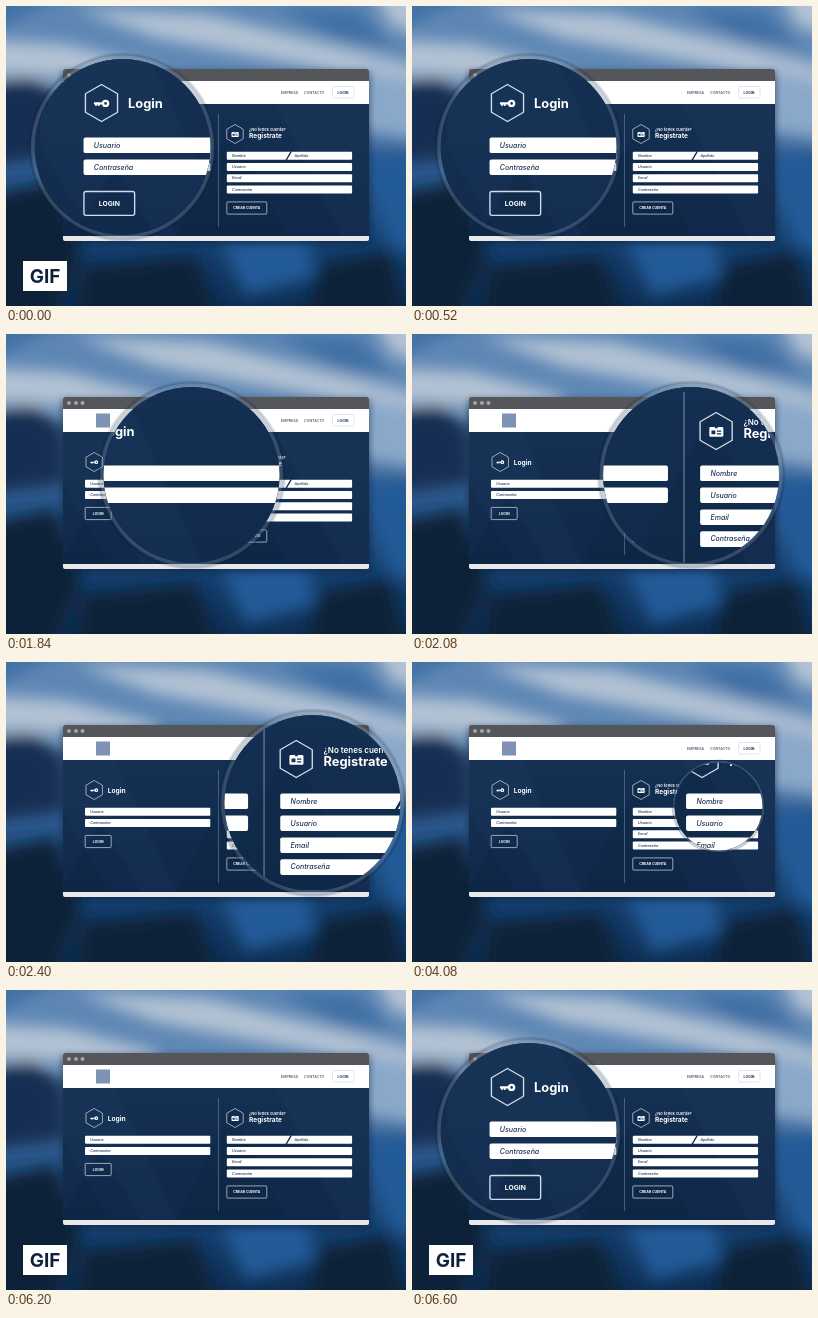
Recreate the animation shown at these times as an HTML page. Size 400x300 px, loop 6.64 s.

```html
<!DOCTYPE html>
<html lang="es">
<head>
<meta charset="utf-8">
<title>Login</title>
<style>
  html, body { margin: 0; width: 100%; height: 100%; overflow: hidden; background: #1c4170; }
  svg { display: block; width: 400px; height: 300px; }
  text { font-family: Inter, "Open Sans", sans-serif; font-weight: 700; }
  .line { fill: none; stroke: #d3dce8; stroke-width: .7; stroke-linejoin: round; }
  .field { fill: #fff; }
  .label { font-size: 3.6px; font-style: italic; font-weight: 500; fill: #1b3157; }
  .title { font-size: 6.6px; fill: #fff; }
  .button { font-size: 3.5px; fill: #fff; text-anchor: middle; }
  .nav { font-size: 3.6px; font-weight: 500; fill: #3c4a63; }
</style>
</head>
<body>
<svg viewBox="0 0 400 300">
  <defs>
    <linearGradient id="sky" x2="0" y2="1">
      <stop offset="0" stop-color="#5d86b4"/>
      <stop offset=".3" stop-color="#6089b5"/>
      <stop offset=".55" stop-color="#2c5a8f"/>
      <stop offset=".8" stop-color="#15406f"/>
      <stop offset="1" stop-color="#0f2f55"/>
    </linearGradient>
    <linearGradient id="navy" x2="0" y2="1">
      <stop offset="0" stop-color="#143052"/>
      <stop offset="1" stop-color="#102849"/>
    </linearGradient>
    <radialGradient id="rim">
      <stop offset=".92" stop-color="#7e93ad" stop-opacity=".4"/>
      <stop offset=".96" stop-color="#62788f" stop-opacity=".35"/>
      <stop offset=".97" stop-color="#0a1830" stop-opacity=".25"/>
      <stop offset="1" stop-color="#0a1830" stop-opacity="0"/>
    </radialGradient>
    <filter id="blur" x="-20%" y="-20%" width="140%" height="140%"><feGaussianBlur stdDeviation="8"/></filter>
    <filter id="soft" x="-10%" y="-10%" width="120%" height="120%"><feGaussianBlur stdDeviation="3"/></filter>
    <clipPath id="lens"><circle id="hole"/></clipPath>
  </defs>

  <rect width="400" height="300" fill="url(#sky)"/>
  <g filter="url(#blur)">
    <path fill="#b3c2d4" d="M-20 34L60 38L150 62V76L-20 68zM70 2L200 8L420 62V88L300 60L150 32zM365-20H420V30L385 20z"/>
    <path fill="#3f6fa4" d="M-20-20H75L-20 28zM270 0L350 5L390 40L330 34z"/>
    <path fill="#8aa9ca" d="M350 62L420 76V135L350 125z"/>
    <path fill="#132f52" d="M-20 80L25 70L60 95V150L-20 160z"/>
    <path fill="#0b2038" d="M-20 190L50 175L75 250L45 320H-20zM75 262L190 250L215 320H70zM310 260L385 245L400 320H300z"/>
    <path fill="#235a98" d="M355 150L420 145V250L385 240zM215 235L300 230L310 270L240 290z"/>
  </g>

  <rect x="56" y="65" width="308" height="172" rx="3" fill="#071529" opacity=".5" filter="url(#soft)"/>
  <path fill="#54565a" d="M57 76V66a3 3 0 0 1 3-3H360a3 3 0 0 1 3 3V76z"/>
  <g fill="#a3a5a8"><circle cx="63" cy="69" r="2"/><circle cx="70" cy="69" r="2"/><circle cx="76.500" cy="69" r="2"/></g>
  <path fill="#fff" d="M57 75H363V98H57z"/>
  <path fill="#e6e8ea" d="M57 230H363V233a2 2 0 0 1-2 2H59a2 2 0 0 1-2-2z"/>
  <rect x="90" y="79.500" width="14" height="14" fill="#7f92b5"/>
  <text class="nav" x="275" y="87.500">EMPRESA</text>
  <text class="nav" x="298" y="87.500">CONTACTO</text>
  <rect x="326.500" y="80.500" width="21.500" height="11.500" rx="1" fill="none" stroke="#d5dbe4" stroke-width=".7"/>
  <text class="button" x="337" y="87.600" style="fill:#1d3a68">LOGIN</text>

  <g id="page">
    <path fill="url(#navy)" d="M57 98H363V230H57z"/>
    <path fill="#3a6399" opacity=".07" d="M57 98H110L170 230H135L95 160L57 225zM270 98H363V230H335z"/>
    <path fill="#06152f" opacity=".1" d="M57 150L103 230H57zM170 230L225 120L280 230z"/>
    <path stroke="#9fb0c8" stroke-opacity=".55" stroke-width=".7" d="M212.500 108V221"/>
    <g id="form"></g>
    <path fill="none" stroke="#fff" stroke-width="1.100" stroke-linecap="round" d="M84.800 128.200H89M85.400 128.300V129M86.800 128.300V129"/>
    <circle cx="90.300" cy="128.200" r="1.300" fill="none" stroke="#fff" stroke-width="1.200"/>
    <rect x="225.500" y="126" width="7.200" height="5" rx=".7" fill="#fff"/>
    <path fill="#18325a" d="M226.600 127.700h2v2h-2zM229.400 127.800h2.200v.6h-2.200zM229.400 129.200h2.200v.6h-2.200zM228.400 125.800h1.400v.8h-1.400z"/>
    <path stroke="#142c52" stroke-width="1.300" d="M280 154.300L285.300 145.300"/>
    <text class="title" x="101.800" y="130.700">Login</text>
    <text x="243" y="125" font-size="4.100" fill="#fff" style="font-weight:600">¿No tenes cuenta?</text>
    <text class="title" x="243" y="131.800">Registrate</text>
  </g>

  <circle id="ring" r="95" fill="url(#rim)"/>
  <g clip-path="url(#lens)">
    <rect width="400" height="300" fill="#132e50"/>
    <use id="zoom" href="#page"/>
  </g>

  <g id="badge">
    <rect x="17" y="255" width="44" height="30" fill="#fff"/>
    <text x="39" y="277" font-size="19" text-anchor="middle" fill="#10213f">GIF</text>
  </g>
</svg>
<script>
const $ = id => document.getElementById(id);
const LOOP = 6640, STEP = 40, RADIUS = 88, ZOOM = 1.95;

const hexagon = (x, y, r) => {
  const points = [0, 1, 2, 3, 4, 5].map(i => {
    const a = (i + .5) * Math.PI / 3;
    return `${x + r * Math.cos(a)},${y + r * Math.sin(a)}`;
  });
  return `<polygon class="line" points="${points.join(' ')}"/>`;
};
const label = (x, y, s) => `<text class="label" x="${x}" y="${y + 1.2}">${s}</text>`;
const fields = (x, names) => names.map((s, i) => {
  const y = 149.7 + i * 11.25;
  return `<rect class="field" x="${x}" y="${y - 4}" width="125.3" height="8" rx="1"/>` + label(x + 5.3, y, s);
}).join('');
const button = (x, y, w, s) =>
  `<rect class="line" x="${x}" y="${y}" width="${w}" height="12.2" rx="1"/>` +
  `<text class="button" x="${x + w / 2}" y="${y + 7.4}">${s}</text>`;

$('form').innerHTML =
  hexagon(88.2, 128, 9.5) + hexagon(229, 128, 9.5) +
  fields(79, ['Usuario', 'Contraseña']) +
  fields(220.8, ['Nombre', 'Usuario', 'Email', 'Contraseña']) +
  label(288.5, 149.7, 'Apellido') +
  button(79.2, 173.4, 26, 'LOGIN') + button(220.8, 195.9, 40, 'CREAR CUENTA');

const part = (t, from, to) => Math.min(1, Math.max(0, (t - from) / (to - from)));
const inOut = p => p < .5 ? 4 * p ** 3 : 1 - 4 * (1 - p) ** 3;
const ease = (t, from, to) => inOut(part(t, from, to));

function draw(t) {
  // The page slides the other way inside the moving lens.
  const back = t >= 5000;
  const move = back ? 0 : ease(t, 1350, 2440);
  const slide = back ? 0 : ease(t, 1310, 2500);
  const size = back ? ease(t, 6180, 6610) : 1 - ease(t, 3900, 4260);
  const x = 116.5 + 190 * move, y = 141 + 7 * (1 - size);
  $('hole').setAttribute('cx', x);
  $('hole').setAttribute('cy', y);
  $('hole').setAttribute('r', RADIUS * size);
  $('ring').setAttribute('transform', `translate(${x} ${y}) scale(${size})`);
  $('zoom').setAttribute('transform',
    `translate(${-76.5 - 80 * slide} ${97 - 128 * ZOOM}) scale(${ZOOM})`);

  // The badge fades out, then rises from below.
  const entering = t >= 4640;
  $('badge').setAttribute('opacity', entering ? 1 : 1 - part(t, 0, 520));
  $('badge').setAttribute('transform',
    `translate(0 ${entering ? 45 * (1 - ease(t, 4640, 4980)) : 0})`);
}

let start;
function tick(now) {
  start ??= now;
  draw(Math.floor((now - start) % LOOP / STEP) * STEP);
  requestAnimationFrame(tick);
}
draw(0);
requestAnimationFrame(tick);
</script>
</body>
</html>
```
